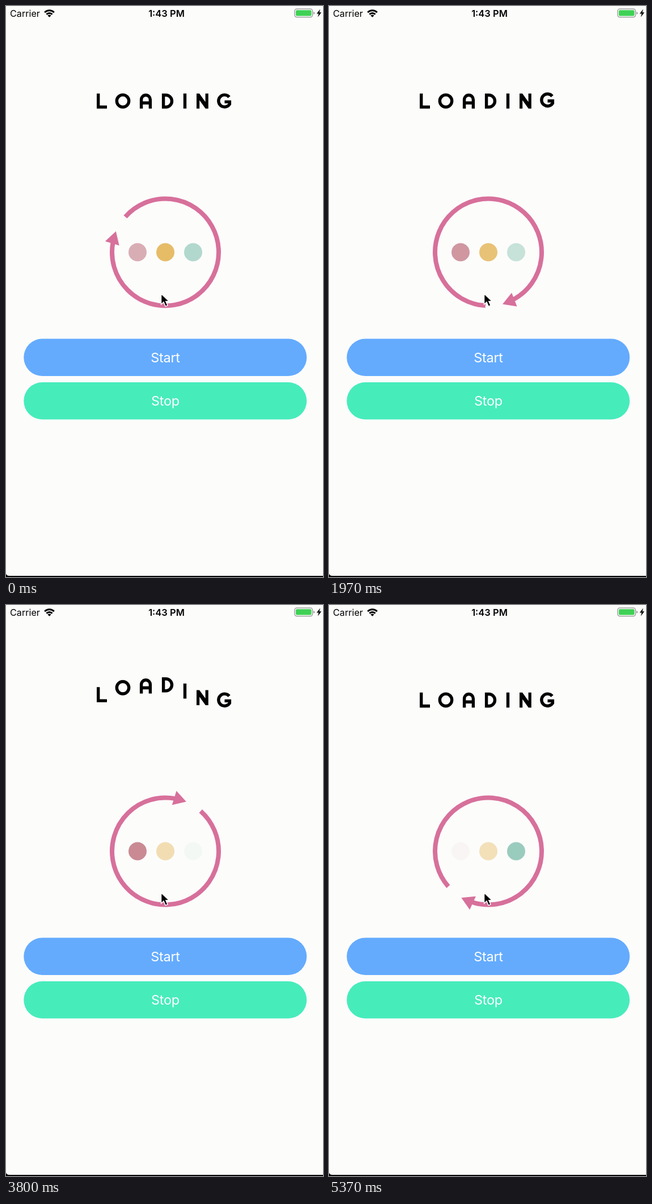
Animation, 559 px wide and 1003 px high, one loop 5.41 s. Source, as an HTML page:

```html
<!DOCTYPE html>
<html lang="en">
<head>
<meta charset="utf-8">
<title>Loading</title>
<style>
html, body { margin: 0; width: 100%; height: 100%; overflow: hidden; background: #000; }
svg { display: block; width: 559px; height: 1003px; }
text { font-family: Inter, "Liberation Sans", sans-serif; }
.button { font-size: 23.5px; letter-spacing: -.3px; fill: #fff; text-anchor: middle; }
#word { fill: none; stroke: #000; stroke-width: 5.4; }
</style>
</head>
<body>
<svg viewBox="0 0 559 1003">
  <path d="M0 0H559V1001H6Q1 1001 0 997Z" fill="#fcfcfb"/>

  <!-- status bar -->
  <text x="7" y="19" font-size="16.2">Carrier</text>
  <g fill="none" stroke="#000" stroke-width="3">
    <path d="M68.2 11.2a11.8 11.8 0 0 1 16.6 0M71.4 14.6a7.3 7.3 0 0 1 10.2 0"/>
    <path d="M76.5 19.8l-3.1-3.1a4.4 4.4 0 0 1 6.2 0z" fill="#000" stroke="none"/>
  </g>
  <text x="283" y="19" font-size="16.5" font-weight="600" text-anchor="middle">1:43 PM</text>
  <rect x="509" y="5.2" width="31.5" height="14.4" rx="3.8" fill="none" stroke="#929292" stroke-width="1.3"/>
  <rect x="511" y="7.2" width="27.5" height="10.4" rx="2" fill="#3fd155"/>
  <path d="M542.3 10q2 .6 2 2.4t-2 2.4z" fill="#929292"/>
  <path d="M554 5.5L547.8 13.6H551.4L549.8 19.6L556.2 11.3H552.5Z"/>

  <g id="word">
    <path d="M162.7 153.7V177.5H178"/>
    <circle cx="206" cy="166.8" r="10.7"/>
    <path d="M238.6 180.2V164.4a7.9 7.9 0 0 1 15.8 0V180.2M238.6 170.3H254.4"/>
    <path d="M277.6 156.5V177.5H282a10.5 10.5 0 0 0 0-21Z"/>
    <path d="M315.5 153.7V180.2"/>
    <path d="M336 153.8h5l10.6 14.6v-14.6h5.2v26.4h-5l-10.6-14.6v14.6h-5.2z" fill="#000" stroke="none"/>
    <path d="M393.6 160A10.6 10.6 0 1 0 394.4 172.3V168.4H385.5"/>
  </g>

  <g id="ring">
    <path id="arc" fill="none" stroke="#d7709b" stroke-width="8"/>
    <path d="M0-94.6L-23.4-105.3L-20.8-79.5Z" fill="#d7709b"/>
  </g>

  <g id="dots">
    <circle cx="232" cy="432.5" r="16" fill="#c27884"/>
    <circle cx="281" cy="432.5" r="16" fill="#e6ba63"/>
    <circle cx="330" cy="432.5" r="16" fill="#87c3b3"/>
  </g>

  <rect x="31.3" y="584.5" width="499" height="65.5" rx="32.75" fill="#64abfe"/>
  <text class="button" x="281" y="626">Start</text>
  <rect x="31.3" y="661" width="499" height="65.3" rx="32.65" fill="#47ecbb"/>
  <text class="button" x="281" y="702">Stop</text>

  <!-- pointer -->
  <path d="M273.6 505.5V524.2L278 520L281.2 527.6L285 526L281.8 518.6H287.3Z" stroke="#fff" stroke-width="1.4"/>
</svg>
<script>
const LOOP = 5410;
const $ = id => document.getElementById(id);
const letters = [...$('word').children], dots = [...$('dots').children];

const LIFT = 30, HALF = 360, WAVE = 2514, WAVE_START = 700;
const delays = [0, 100, 130, 300, 400, 500, 600];
const dotPhase = [.18, -.01, -.21];

const polar = deg => {
  const a = deg * Math.PI / 180;
  return `${94 * Math.sin(a)} ${-94 * Math.cos(a)}`;
};
$('arc').setAttribute('d', `M${polar(18.5)}A94 94 0 1 1 ${polar(-13)}`);

// Up and back down, eased both ways
function lift(age) {
  const x = Math.max(0, 1 - Math.abs(age / HALF - 1));
  return LIFT * x * x * (3 - 2 * x);
}

function draw(now) {
  const t = Math.max(27, now % LOOP); // the opening pose holds briefly
  $('ring').setAttribute('transform', `translate(281 432.5) rotate(${.1193 * t - 70.4})`);

  const wave = (t - WAVE_START + WAVE) % WAVE;
  letters.forEach((el, i) =>
    el.setAttribute('transform', `translate(0 ${-lift(wave - delays[i])})`));

  dots.forEach((el, i) => {
    const turn = (t * .000986 + dotPhase[i] + 1) % 1;
    el.setAttribute('opacity', Math.abs(1 - 2 * turn));
  });
}

let start;
function tick(now) {
  start ??= now;
  draw(now - start);
  requestAnimationFrame(tick);
}
draw(0);
requestAnimationFrame(tick);
</script>
</body>
</html>
```
